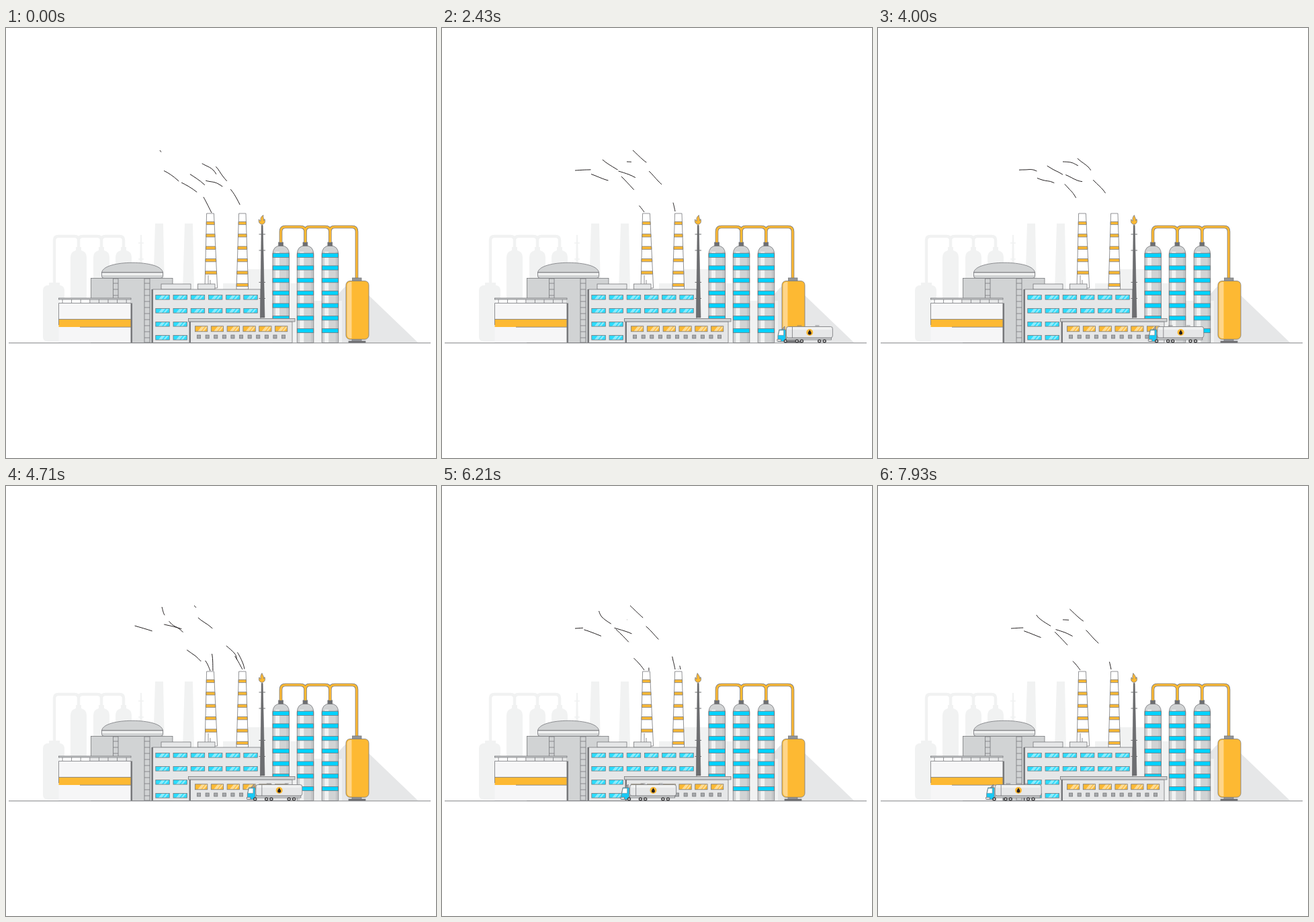
Write an HTML page that moves like this. It is 640 by 640 pixels and loops after 8000 ms.

```html
<!DOCTYPE html>
<html lang="en">
<head>
<meta charset="utf-8">
<title>Refinery</title>
<style>
html, body { margin: 0; width: 100%; height: 100%; overflow: hidden; background: #fff; }
svg { display: block; width: 100vw; height: 100vh; }
</style>
</head>
<body>
<svg id="stage" viewBox="0 0 640 640"></svg>
<script>
const stage = document.getElementById('stage');
const LINE = '#77787b', DARK = '#77787b', PALE = '#f1f2f2', LIGHT = '#e6e7e8', MID = '#d1d3d4';
const ORANGE = '#fdb933', BLUE = '#00d2ff', INK = '#231f20';
const LOOP = 8000, STEP = LOOP / 112;

function add(tag, attrs, parent = stage) {
  const el = document.createElementNS('http://www.w3.org/2000/svg', tag);
  for (const k in attrs) el.setAttribute(k, attrs[k]);
  parent.appendChild(el);
  return el;
}
const group = (attrs = {}, parent = stage) => add('g', attrs, parent);
const path = (d, fill, stroke = 'none', parent = stage, width = 0.8) =>
  add('path', { d, fill, stroke, 'stroke-width': width }, parent);
// Box by its edges
const box = (x0, y0, x1, y1, fill, stroke = LINE, parent = stage, rx = 0) =>
  add('rect', { x: x0, y: y0, width: x1 - x0, height: y1 - y0, rx, fill, stroke, 'stroke-width': 0.8 }, parent);
const line = (x0, y0, x1, y1, parent = stage, color = LINE, width = 0.8) =>
  path(`M${x0} ${y0}L${x1} ${y1}`, 'none', color, parent, width);

function backdrop() {
  path('M430 468L500 390Q507 382 512 382L524 384L540 398L613 468Z', LIGHT);
  const g = group({ fill: PALE });
  const fill = d => add('path', { d }, g);
  box(55, 383, 87, 467, PALE, 'none', g, 7);
  box(64, 379, 80, 385, PALE, 'none', g);
  for (const x of [96, 130, 163])
    fill(`M${x} 468V342Q${x} 333 ${x + 8} 331V326H${x + 16}V331Q${x + 24} 333 ${x + 24} 342V468Z`);
  path('M72 380V316Q72 310 78 310H102Q108 310 108 316V330V316Q108 310 114 310H136Q142 310 142 316V330V316Q142 310 148 310H169Q175 310 175 316V330',
    'none', PALE, g, 4.5);
  fill('M222 291H234L236 390H219Z');
  fill('M266 291H278L280 390H263Z');
  fill('M200 308H202L204 400H198Z');
  for (const y of [320, 344]) line(197, y, 205, y, g, PALE, 1.5);
  fill('M323 389V380H360V359H397V380H433V406H500V468H323Z');
}

function ladder(x0, x1, y0, y1) {
  box(x0, y0, x1, y1, MID);
  for (let y = y0 + 7; y < y1; y += 9) line(x0, y, x1, y);
}

function reactor() {
  box(126.5, 372.5, 248, 468.5, MID);
  path('M142.5 364C144 354 166 349.3 188 349.3C211 349.3 232 354 233.5 364Z', MID, LINE);
  path('M142.5 364H233.5V369Q233.5 372.5 230 372.5H146Q142.5 372.5 142.5 369Z', MID, LINE);
  box(143, 364, 233, 368, PALE, 'none');
  line(142.5, 364, 233.5, 364);
  ladder(159.5, 167, 373, 410);
  ladder(206, 214, 373, 468);
}

function storage() {
  box(80, 404, 185, 409.5, '#fff', 'none');
  box(125, 404, 185, 409.5, LIGHT, 'none');
  for (let x = 84; x < 186; x += 13.6) line(x, 404, x, 409);
  box(78.5, 402, 186, 404, MID);
  box(78.5, 409.5, 186, 468.5, '#f6f6f7', 'none');
  box(78.5, 433.5, 186, 445, ORANGE, 'none');
  path('M78.5 442V409.5H186M78.5 433.5H186M110 445.2H186', 'none', LINE);
  box(185.5, 409.5, 188, 468.5, DARK, 'none');
}

function chimney(top, bottom, base, bands) {
  const [a, b] = top, [c, d] = bottom;
  const edge = (p, q, y) => p + (q - p) * (y - 276) / (base - 276);
  path(`M${a} 276H${b}L${d} ${base}H${c}Z`, '#fff', LINE);
  for (let i = 0; i < bands; i++) {
    const y = 288.3 + 18.4 * i, z = y + 4.3;
    path(`M${edge(a, c, y)} ${y}H${edge(b, d, y)}L${edge(b, d, z)} ${z}H${edge(a, c, z)}Z`, ORANGE, LINE);
  }
}

function glass(x, y, w, h, fill, shine) {
  box(x, y, x + w, y + h, fill, 'none');
  for (const [k, n] of [[0.2, 5], [0.55, 3]]) {
    const p = x + w * k;
    path(`M${p} ${y + h}L${p + h * 0.8} ${y}h${n}L${p + n} ${y + h}Z`, shine);
  }
  box(x, y, x + w, y + h, 'none');
}

function hall() {
  box(231, 381, 275, 389, LIGHT);
  box(285.5, 381, 311, 389, LIGHT);
  line(301, 368, 301, 381);
  line(304, 375, 304, 381);
  box(218, 389, 379, 468.5, LIGHT);
  box(216.5, 389, 219, 468.5, DARK, 'none');
  for (let r = 0; r < 4; r++)
    for (let c = 0; c < 6; c++)
      glass(222.8 + 26.2 * c, 397.5 + 20 * r, 20.5, 6.6, '#2bdcff', '#8cecff');
}

function office() {
  box(274.5, 437, 426, 468.5, LIGHT);
  box(272.5, 437, 275, 468.5, DARK, 'none');
  box(271.5, 432.5, 430, 437, MID);
  for (let i = 0; i < 6; i++) glass(281.5 + 23.8 * i, 443.8, 18.3, 8, ORANGE, '#ffdc94');
  for (let i = 0; i < 11; i++) box(284.5 + 12.6 * i, 457, 289.6 + 12.6 * i, 462, '#a7a9ac');
}

function column(x) {
  const d = `M${x} 468.5V337Q${x} 324 ${x + 12.2} 324Q${x + 24.5} 324 ${x + 24.5} 337V468.5Z`;
  path(d, MID);
  box(x + 4, 333, x + 10, 468, PALE, 'none');
  box(x + 20.5, 333, x + 24, 468, '#c4c6c8', 'none');
  for (let y = 335.2; y < 460; y += 18.7) box(x, y, x + 24.5, y + 6.2, BLUE);
  path(d, 'none', LINE);
  box(x + 8.7, 319, x + 15.5, 324.3, '#6d6e71');
}

function pipes() {
  const d = 'M409 319V303Q409 296 416 296H438Q445.5 296 445.5 303V319V303Q445.5 296 452 296H475Q482.3 296 482.3 303V319V303Q482.3 296 489 296H515Q522 296 522 303V372';
  path(d, 'none', LINE, stage, 4.6);
  path(d, 'none', ORANGE, stage, 3.1);
}

function orangeTank() {
  box(515.5, 372, 529, 377, '#939598');
  box(515, 462, 529, 466.5, '#939598');
  box(510, 466, 535, 468.5, '#6d6e71');
  box(506, 376.5, 540, 463.3, ORANGE, LINE, stage, 6);
  path('M514.5 378H512Q507.5 379 507.5 384V456Q507.5 461 512 462H514.5Z', '#ffd68a');
}

function flare() {
  path('M380.2 293.5H382.2L385 431H378.5Z', '#6d6e71', '#58595b', stage, 0.5);
  for (const y of [307, 331, 378.5, 402.5]) line(376.5, y, 386, y, stage, '#6d6e71', 1);
  return path('', ORANGE, LINE);
}

function truck() {
  const g = group();
  box(13, 461, 80, 464, MID, LINE, g);
  line(56, 443, 62, 443, g);
  line(29, 443, 36, 443, g);
  box(13, 444.5, 82, 461, LIGHT, LINE, g, 3);
  box(15, 445.5, 80, 449, PALE, 'none', g, 1.5);
  line(22, 445, 22, 461, g);
  path('M6 449L10.5 444V449Z', '#a7a9ac', LINE, g);
  path('M2.5 449H12V466.5H0.5V458Z', '#18c9f5', LINE, g);
  path('M2.8 450H9V457.3H1.2Z', '#fff', LINE, g, 0.5);
  box(-0.5, 463.5, 5, 466, '#fff', LINE, g);
  for (const x of [11.8, 28.8, 36, 62.3, 69.8]) {
    add('circle', { cx: x, cy: 466, r: 2.8, fill: '#4d4d4f' }, g);
    add('circle', { cx: x, cy: 466, r: 1.1, fill: '#fff' }, g);
  }
  add('circle', { cx: 47.8, cy: 453, r: 5, fill: ORANGE }, g);
  path('M47.8 449.3C49 451.5 50.3 452.6 50.3 454A2.5 2.5 0 0 1 45.3 454C45.3 452.6 46.6 451.5 47.8 449.3Z', INK, 'none', g);
  return g;
}

// Smooth curve through a flat list of coordinates
function curve(v) {
  const n = v.length / 2;
  const at = i => { const k = 2 * Math.max(0, Math.min(n - 1, i)); return [v[k], v[k + 1]]; };
  let d = `M${at(0)}`;
  for (let i = 0; i < n - 1; i++) {
    const [a, b, c, e] = [at(i - 1), at(i), at(i + 1), at(i + 2)];
    d += `C${b.map((p, k) => p + (c[k] - a[k]) / 6)} ${c.map((p, k) => p - (e[k] - b[k]) / 6)} ${c}`;
  }
  return d;
}

// Each puff is a dash of fixed length drifting along its curve
function plume({ gap, start, speed, trails }) {
  const dashes = trails.map(([lead, pts]) => {
    const el = path(curve(pts), 'none', INK, stage, 1);
    el.setAttribute('stroke-dasharray', `27 ${gap - 27}`);
    return { el, lead };
  });
  return t => dashes.forEach(({ el, lead }) =>
    el.setAttribute('stroke-dashoffset', 27 - (start + speed * t + lead)));
}

backdrop();
reactor();
storage();
chimney([298.6, 309.4], [296, 314.6], 387, 5);
chimney([346.6, 357], [343, 360.6], 389, 6);
hall();
[397, 433.3, 470.2].forEach(column);
pipes();
orangeTank();
const flame = flare();
office();
line(4, 468.8, 632, 468.8, stage, '#808285', 1);
const lorry = truck();

const plumes = [
  plume({ gap: 120, start: 72, speed: 0.0664, trails: [
    [0, [308, 275, 306, 248, 294, 232, 273, 217, 258, 209, 238, 195, 232, 180]],
    [19, [301, 274, 294, 265, 282, 253, 267, 242, 255, 226, 234, 212, 218, 211, 198, 212]],
    [-46, [306, 275, 293, 250, 284, 239, 267, 221, 257, 212, 245, 204, 229, 182]],
    [-8, [304, 275, 298, 262, 285, 245, 261, 230, 244, 226, 218, 216, 188, 207]]
  ] }),
  plume({ gap: 118, start: 80, speed: 0.064, trails: [
    [14, [347, 273, 344, 260, 340, 249, 321, 231, 309, 212, 296, 204, 287, 200, 275, 199]],
    [0, [355, 273, 353, 265, 347, 252, 339, 240, 323, 221, 313, 207, 299, 196, 280, 178]],
    [-5, [352, 273, 338, 250, 316, 232, 297, 227, 278, 218, 252, 210, 235, 206]],
    [-42, [353, 273, 344, 255, 335, 241, 322, 228, 305, 210, 286, 196, 276, 179]]
  ] })
];

function draw(t) {
  plumes.forEach(p => p(t));
  lorry.setAttribute('transform', `translate(${648.8 - 0.0615 * t} 0)`);
  const sway = Math.cos(Math.PI * t / LOOP);
  const tip = 381.4 + 1.6 * sway, side = 376.8 - 0.4 * sway;
  flame.setAttribute('d',
    `M381 292.3C377.5 292 375.6 289 ${side} 284.8Q377.6 287 379.2 287.3C378.3 283.5 379.6 280.5 ${tip} 278.6C382.2 282 384 283.5 383.4 286.6Q384.6 286 384.9 284.4C386.5 288.5 384.8 292 381 292.3Z`);
}

const begin = performance.now();
function tick() {
  const t = (performance.now() - begin) % LOOP;
  draw(Math.floor((t + 5) / STEP) * STEP);
  requestAnimationFrame(tick);
}
draw(0);
requestAnimationFrame(tick);
</script>
</body>
</html>
```
